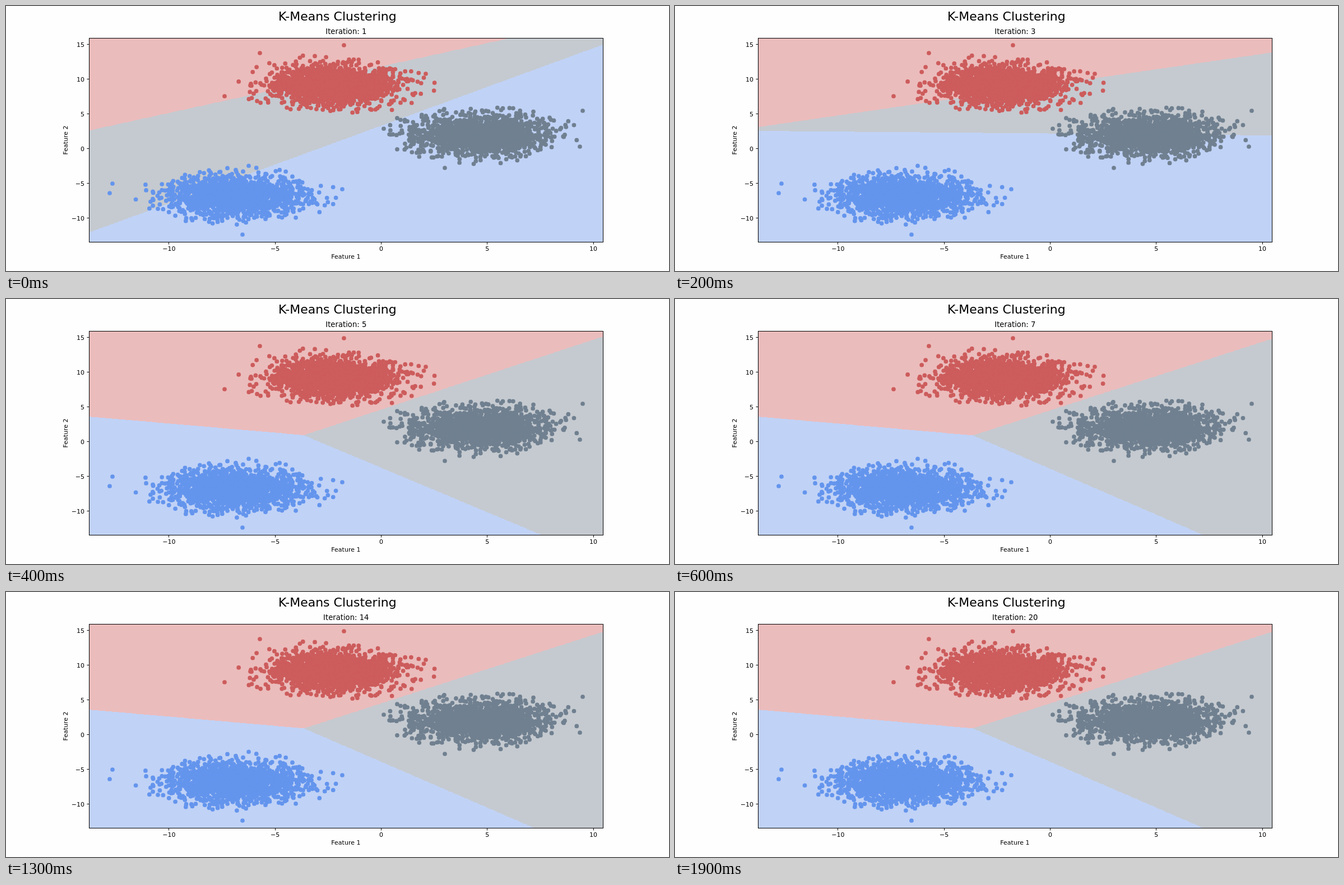
These frames come from a looping animation (1183x473 px, 2000 ms). An HTML page with a canvas:

```html
<!DOCTYPE html>
<html lang="en">
<head>
<meta charset="utf-8">
<title>K-Means Clustering</title>
<style>
  html, body { margin: 0; width: 100%; height: 100%; overflow: hidden; background: #fefefe; }
  canvas, svg { position: absolute; left: 0; top: 0; display: block; }
  text { font-family: "DejaVu Sans", sans-serif; font-size: 11px; fill: #000; }
  .mid { text-anchor: middle; }
  .end { text-anchor: end; }
</style>
</head>
<body>
<canvas id="regions" width="1183" height="473"></canvas>
<canvas id="points" width="1183" height="473"></canvas>
<svg id="axes" width="1183" height="473" viewBox="0 0 1183 473">
  <rect x="148.5" y="57.5" width="917" height="364" fill="none" stroke="#000"/>
  <text class="mid" x="591.4" y="25.8" style="font-size:22px">K-Means Clustering</text>
  <text class="mid" x="606.8" y="50" style="font-size:13.2px" id="counter">Iteration: 1</text>
  <text class="mid" x="606.4" y="451">Feature 1</text>
  <text class="mid" transform="translate(110 239.5) rotate(-90)">Feature 2</text>
</svg>
<script>
const LOOP = 2000, STEP = 100;
const BOX = { left: 149, top: 58, right: 1065, bottom: 421 };

// Borders between regions, as heights at the left and right side of the box.
// Where the first two have crossed, the grey region ends and redBlue takes over.
const SPLITS = [
  { redGrey: [222, 21], greyBlue: [404, 69] },
  { redGrey: [157, 141], greyBlue: [277, 181] },
  { redGrey: [216, 83], greyBlue: [223, 231] },
  { redGrey: [331, 32], greyBlue: [154, 329], redBlue: [218, 222] },
  { redGrey: [369, 67], greyBlue: [83, 467], redBlue: [210, 289] },
  { redGrey: [367, 71], greyBlue: [78, 474], redBlue: [210, 290] }
];

// Normal clouds; "far" holds the few points that stand well apart.
const CLUSTERS = [
  { color: '#6495ed', x: 409, y: 339, seed: 11,
    far: [[185, 334], [190, 317], [600, 327], [422, 408]] },
  { color: '#cd5c5c', x: 586, y: 141, seed: 5,
    far: [[390, 161], [453, 84], [603, 70], [749, 121]] },
  { color: '#708090', x: 843, y: 230, seed: 23,
    far: [[674, 219], [783, 289], [1024, 251], [1029, 187]] }
];
const COUNT = 1667, SPREAD_X = 59, SPREAD_Y = 17.8, REACH = 3.1, RADIUS = 3.85;

const byId = id => document.getElementById(id);
const regions = byId('regions').getContext('2d');
const counter = byId('counter');

function random(seed) {
  return () => {
    seed = (seed + 0x6d2b79f5) | 0;
    let t = Math.imul(seed ^ (seed >>> 15), 1 | seed);
    t = (t + Math.imul(t ^ (t >>> 7), 61 | t)) ^ t;
    return ((t ^ (t >>> 14)) >>> 0) / 4294967296;
  };
}

function drawClusters() {
  const ctx = byId('points').getContext('2d');
  const dot = (x, y) => {
    ctx.beginPath();
    ctx.arc(x, y, RADIUS, 0, Math.PI * 2);
    ctx.fill();
  };
  for (const { color, x, y, seed, far } of CLUSTERS) {
    const rnd = random(seed);
    ctx.fillStyle = color;
    for (let i = 0; i < COUNT; i++) {
      const r = Math.sqrt(-2 * Math.log(1 - rnd())), a = rnd() * Math.PI * 2;
      if (r < REACH) dot(x + r * Math.cos(a) * SPREAD_X, y + r * Math.sin(a) * SPREAD_Y);
    }
    far.forEach(p => dot(...p));
  }
}

function drawRegions(step) {
  const { redGrey, greyBlue, redBlue } = SPLITS[Math.min(step, SPLITS.length - 1)];
  const { left, top, right, bottom } = BOX;
  const edge = ([y0, y1], x) => {
    const y = Math.round(y0 + (y1 - y0) * (x - left) / (right - left));
    return Math.min(bottom, Math.max(top, y));
  };
  const fill = (color, x, y0, w, y1) => {
    regions.fillStyle = color;
    regions.fillRect(x, y0, w, y1 - y0);
  };
  fill('#c5cad0', left, top, right - left, bottom);
  for (let x = left; x < right; x += 4) {
    const w = Math.min(4, right - x), mid = x + w / 2;
    let red = edge(redGrey, mid), blue = edge(greyBlue, mid);
    if (red > blue) red = blue = edge(redBlue, mid);
    fill('#ebbcbc', x, top, w, red);
    fill('#c0d2f6', x, blue, w, bottom);
  }
}

function addSvg(name, attrs, label = '') {
  const el = document.createElementNS('http://www.w3.org/2000/svg', name);
  for (const key in attrs) el.setAttribute(key, attrs[key]);
  el.textContent = label;
  byId('axes').append(el);
}

function drawTicks() {
  const name = v => String(v).replace('-', '\u2212');
  const tick = d => addSvg('path', { d, stroke: '#000' });
  for (let v = -10; v <= 10; v += 5) {
    const x = 669.5 + v * 37.86;
    tick(`M${Math.floor(x) + 0.5} 422v3.5`);
    addSvg('text', { class: 'mid', x, y: 437 }, name(v));
  }
  for (let v = -10; v <= 15; v += 5) {
    const y = 254.5 - v * 12.4;
    tick(`M148 ${Math.floor(y) + 0.5}h-3.5`);
    addSvg('text', { class: 'end', x: 140, y: y + 4 }, name(v));
  }
}

let shown = -1;
function show(step) {
  if (step === shown) return;
  shown = step;
  drawRegions(step);
  counter.textContent = `Iteration: ${step + 1}`;
}

drawTicks();
drawClusters();
show(0);

const start = performance.now();
function frame() {
  show(Math.floor((performance.now() - start) % LOOP / STEP));
  requestAnimationFrame(frame);
}
requestAnimationFrame(frame);
</script>
</body>
</html>
```
